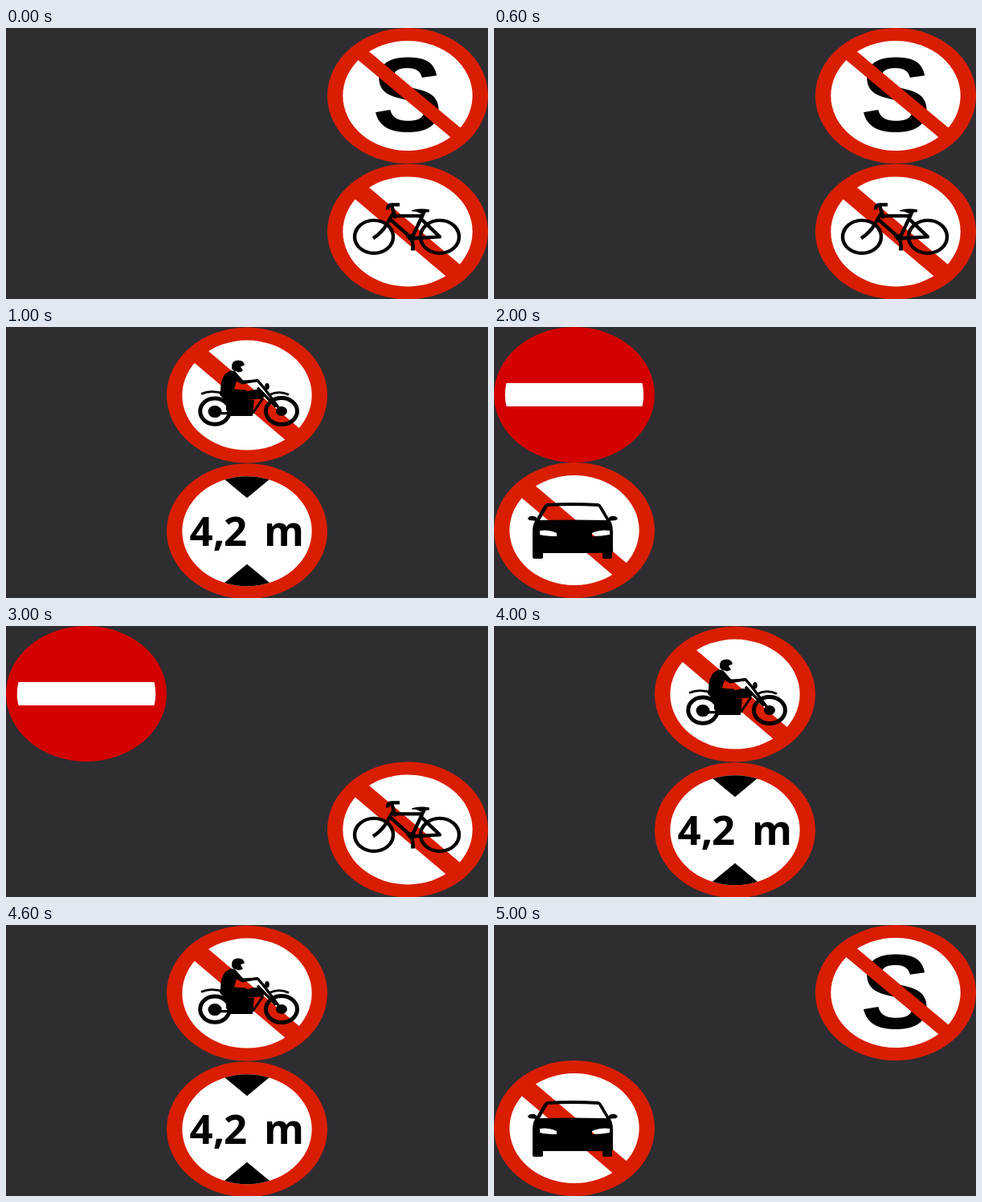
An HTML page for the animation above (6 s loop, 600 by 338 pixels).

```html
<!DOCTYPE html>
<html lang="en">
<head>
<meta charset="utf-8">
<title>Road signs</title>
<style>
  html, body { margin: 0; width: 100%; height: 100%; overflow: hidden; background: #2e2d32; }
  svg { display: block; width: 100%; height: 100%; }
  .rim { fill: #d91e00; }
  .face { fill: #fff; }
  .bar { stroke: #d91e00; stroke-width: 22.4; }
  .line { fill: none; stroke: #000; stroke-width: 4.4; stroke-linejoin: round; }
  text { font-weight: bold; }
</style>
</head>
<body>
<svg viewBox="0 0 600 338">
  <defs>
    <clipPath id="inside"><ellipse cx="100" cy="84.5" rx="80.7" ry="68.5"/></clipPath>
    <g id="plate">
      <ellipse class="rim" cx="100" cy="84.5" rx="100" ry="84.5"/>
      <ellipse class="face" cx="100" cy="84.5" rx="80.7" ry="68.5"/>
    </g>
    <path id="slash" class="bar" d="M36 30.600L164 139.400"/>
  </defs>

  <!-- data-on lists the seconds of the loop in which a sign shows -->
  <g data-on="05" transform="translate(400 0)">
    <use href="#plate"/>
    <text x="100" y="129.3" font-size="131" text-anchor="middle" font-family="Liberation Sans, Arial, sans-serif">S</text>
    <path class="bar" style="stroke-width:17" d="M36 27.100L167 136.600"/>
  </g>

  <g data-on="03" transform="translate(400 169.4)">
    <use href="#plate"/>
    <use href="#slash"/>
    <g class="line">
      <ellipse cx="58" cy="91" rx="24" ry="20.5"/>
      <ellipse cx="140" cy="91" rx="24" ry="20.5"/>
      <path d="M57 93Q66 87 71 80L83 60M75 57Q75 51 80 51H90M80 52L85 68M80 65H119M78 69L105 93M121 59L105 93L140 91L116 68"/>
      <path d="M105 92L107 105M98 90H109M104 106H109"/>
    </g>
    <ellipse cx="105" cy="92" rx="5" ry="4.5"/>
    <path d="M105 58Q115 55 127 57V60Q119 60 116 62Q111 59 105 59Z"/>
  </g>

  <g data-on="14" transform="translate(200 .6)">
    <use href="#plate"/>
    <use href="#slash"/>
    <g class="line">
      <ellipse cx="60" cy="104.5" rx="18.3" ry="16.2" stroke-width="5"/>
      <ellipse cx="143" cy="104.5" rx="19.5" ry="16.5" stroke-width="5"/>
      <path stroke-width="3.4" d="M106 67L113 66L120 74L143 105M113 75L136 99M60 107H80"/>
      <path stroke-width="2.8" d="M128 84Q140 78 152 84M43 83Q56 77 72 83M120 88L107 107"/>
    </g>
    <ellipse cx="60" cy="105" rx="8.5" ry="7.5"/>
    <ellipse cx="143" cy="104.5" rx="7" ry="6"/>
    <ellipse cx="125" cy="73.5" rx="2.8" ry="4.2"/>
    <path d="M81 51Q80 41 89 41Q96 41 97 47L92 49L95 54Q91 57 87 55Q83 55 81 51Z"/>
    <path d="M79 54Q85 53 88 58L95 66L112 65V68L94 71L87 67L84 77L98 78Q103 80 101 85L100 90H109L107 110.500H79L74 103V93L66 84L67 78Q67 65 73 58Z"/>
    <path d="M98 81Q112 74 121 81Q124 86 118 89L100 90Z"/>
  </g>

  <g data-on="14" transform="translate(200 170.2)">
    <use href="#plate"/>
    <path clip-path="url(#inside)" d="M100 43L59 9H141ZM100 125.500L59 159.500H141Z"/>
    <text y="103" font-size="51" font-family="Noto Sans, Open Sans, sans-serif"><tspan x="28.5">4,</tspan><tspan x="71">2</tspan><tspan x="121">m</tspan></text>
  </g>

  <g data-on="23">
    <ellipse cx="100" cy="84.500" rx="100" ry="84.500" fill="#d40000"/>
    <path class="face" d="M15.500 70H184.500Q188 84.500 184.500 99H15.500Q12 84.500 15.500 70Z"/>
  </g>

  <g data-on="25" transform="translate(0 169)">
    <use href="#plate"/>
    <use href="#slash"/>
    <path fill-rule="evenodd" d="M66 51Q98 49 130 51Q133 52 135 56L143 70Q148 76 148 86V112H147V118Q147 120 145 120H137Q135 120 135 118V113H61V118Q61 120 59 120H50Q48 120 48 118V86Q48 76 53 70L61 56Q63 52 66 51ZM67 55L57 72Q98 71 140 72L130 55Q98 53 67 55ZM57 85Q68 83 78 88V92Q66 92 57 90ZM144 85Q132 83 122 88V92Q134 92 144 90Z"/>
    <path d="M42 70Q44 66 50 67Q54 68 54 73L44 72ZM154 70Q152 66 146 67Q142 68 142 73L152 72Z"/>
  </g>
</svg>
<script>
  const signs = document.querySelectorAll("[data-on]");

  function draw() {
    const second = Math.floor(performance.now() / 1000) % 6;
    for (const sign of signs) {
      sign.style.display = sign.dataset.on.includes(second) ? "" : "none";
    }
    requestAnimationFrame(draw);
  }
  draw();
</script>
</body>
</html>
```
